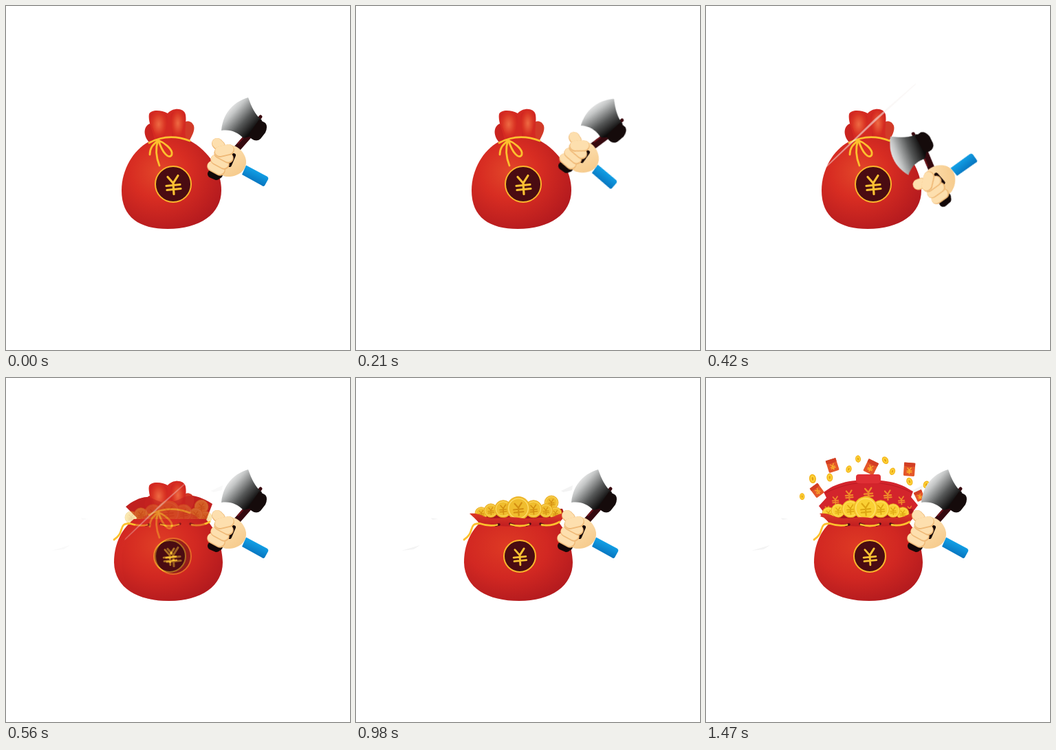
Animation, 500 px wide and 500 px high, one loop 1820 ms. Source, as an HTML page:

```html
<!DOCTYPE html>
<html lang="en">
<head>
<meta charset="utf-8">
<title>Lucky bag</title>
<style>
  html, body { margin: 0; width: 100%; height: 100%; overflow: hidden; background: #fff; }
  svg { display: block; width: 100vw; height: 100vh; }
  .line { fill: none; stroke-linecap: round; stroke-linejoin: round; }
  .tie { stroke: #fcc02e; stroke-width: 2.8; }
</style>
</head>
<body>
<svg viewBox="0 0 500 500">
  <defs>
    <radialGradient id="bodyRed" cx=".38" cy=".38" r=".72">
      <stop offset="0" stop-color="#e2472a"/>
      <stop offset=".4" stop-color="#d82d22"/>
      <stop offset="1" stop-color="#b0181e"/>
    </radialGradient>
    <radialGradient id="openRed" cx=".4" cy=".34" r=".74">
      <stop offset="0" stop-color="#de3a24"/>
      <stop offset=".5" stop-color="#d22822"/>
      <stop offset="1" stop-color="#b0191e"/>
    </radialGradient>
    <radialGradient id="lobe" cx=".5" cy=".45" r=".6">
      <stop offset="0" stop-color="#ee6a43"/>
      <stop offset=".6" stop-color="#da3524"/>
      <stop offset="1" stop-color="#cc201f"/>
    </radialGradient>
    <linearGradient id="lipRed" x1="0" y1="0" x2="0" y2="1">
      <stop offset="0" stop-color="#dd3a27"/>
      <stop offset="1" stop-color="#bf1c20"/>
    </linearGradient>
    <linearGradient id="steel" gradientUnits="userSpaceOnUse" x1="322" y1="146" x2="359" y2="180">
      <stop offset="0" stop-color="#f4f4f4"/>
      <stop offset=".25" stop-color="#c4c6c6"/>
      <stop offset=".65" stop-color="#555757"/>
      <stop offset="1" stop-color="#0e0c0c"/>
    </linearGradient>
    <linearGradient id="skin" x1="0" y1="0" x2=".6" y2="1">
      <stop offset="0" stop-color="#ffe5b8"/>
      <stop offset="1" stop-color="#f6cb8d"/>
    </linearGradient>
    <linearGradient id="cloth" gradientUnits="userSpaceOnUse" x1="366" y1="239" x2="359" y2="255">
      <stop offset="0" stop-color="#12a2e8"/>
      <stop offset="1" stop-color="#0876c0"/>
    </linearGradient>
    <path id="yen" class="line" d="M-8-10L0-1L7-12M-10 3L10 1M-9 9L11 7M0-1L1 15"/>
    <g id="crown">
      <path fill="#c9231f" d="M218 196L207 197C199 187 200 175 209 171C215 176 218 187 218 196Z"/>
      <path fill="#d23a28" d="M256 193L266 197C270 189 275 181 273 174C270 167 264 166 259 169Z"/>
      <path fill="#d42a22" d="M216 195C213 181 206 168 208 157C211 150 226 151 235 156C243 147 259 148 261 158C263 170 258 182 262 194Z"/>
      <path fill="url(#lobe)" d="M219 194C216 180 207 168 210 158C214 151 229 153 234 160C236 172 231 184 229 194Z"/>
      <path fill="url(#lobe)" d="M240 193C244 181 238 167 240 158C245 149 258 151 260 159C261 171 254 182 255 193Z"/>
    </g>
  </defs>

  <g id="wisps" fill="#f3f3f3">
    <path d="M66 251L93 243L84 249Z"/>
    <path d="M109 203.5L120 205L111 206Z"/>
    <path d="M298 164L315 156L314 163L301 166Z"/>
  </g>

  <use id="oldCrown" href="#crown"/>
  <g id="burst"></g>
  <g id="panel"></g>
  <g id="open">
    <path id="flap" fill="#c0201f" d="M174 187C182 180 195 173 205 173C215 174 222 182 235 181C248 181 256 172 268 171C280 171 292 178 300 183L289 212H187L190 203Z"/>
    <path id="rim" fill="#a9161d" d="M174 200L179 191L300 190L304 200L290 208H188Z"/>
    <g id="coinsA"></g>
    <g id="coinsB"></g>
    <path fill="url(#openRed)" d="M186 205C165 222 157 245 157 268C158 306 192 324 237 324C284 324 315 302 315 268C314 245 306 220 290 205Z"/>
    <path id="lip" fill="url(#lipRed)" d="M165 197C181 195 186 204 201 204C216 204 223 201 237 203C252 206 266 202 278 203C291 203 295 194 308 197C303 202 298 206 294 213Q237 219 180 213C176 206 171 203 165 197Z"/>
    <path class="line" stroke="#4b0d13" stroke-width="3.5" d="M203 214L208 213M224 212L230 214M248 214L253 212M268 212L274 214"/>
    <path class="line tie" d="M205 213.5Q193 216 180 211.5C162 211 174 224 157 235M225 213Q238 217 251 213M270 213.5Q284 216 296 209"/>
    <g id="openMark"></g>
  </g>

  <g id="closed">
    <use href="#crown"/>
    <path fill="url(#bodyRed)" d="M208 197C185 209 168 238 168 268C168 308 195 324 235 324C282 324 313 302 313 268C313 240 296 211 266 195C250 189 225 189 208 197Z"/>
    <path class="line tie" d="M208 199Q236 184 267 196M222 195C212 202 209 208 209 216M221 195C216 210 219 222 223 232M221 195C229 198 243 208 241 216C237 224 227 213 222 196"/>
    <g id="closedMark"></g>
  </g>

  <path id="slash" fill="#f6f1ef" d="M326.5 94.5L258 157L175 235L177 231L257 153L325.5 93.5Z"/>

  <g id="axe">
    <path fill="url(#cloth)" d="M349 231.5L380 248Q382 250 381 252L376 261Q374 263 372 261L343 245Z"/>
    <path class="line" stroke="#35090f" stroke-width="10" stroke-linecap="butt" d="M306 242L336 207L365 174"/>
    <path class="line" stroke="#6d141c" stroke-width="2" d="M337 200L352 183"/>
    <path class="line" stroke="#3b0b10" stroke-width="5" d="M366 166L370 161"/>
    <path fill="url(#steel)" d="M352 133C335 138 316 151 313 181C327 179 337 184 345 192L361 188L372 166C362 158 357 147 352 133Z"/>
    <path fill="#150b0b" d="M356 182L368 165L377 170Q381 175 377 184L370 193Q364 198 357 193Q351 189 356 182Z"/>
    <path class="line" stroke="#130808" stroke-width="12" d="M299 244L306 247M303 241L309 245"/>
    <path fill="url(#skin)" d="M317 206C329 196 347 209 349 225C350 240 336 249 320 248C307 247 304 227 317 206Z"/>
    <path class="line" stroke="#180808" stroke-width="6" d="M331 217L325 231"/>
    <g id="fingers" class="line"></g>
  </g>
</svg>

<script>
const LOOP = 1820, STEP = 70;
const $ = id => document.getElementById(id);
const fill = (id, html) => { $(id).innerHTML = html; };
const times = (n, make) => Array.from({ length: n }, (_, i) => make(i)).join('');

let seed = 11;
const random = () => (seed = seed * 16807 % 2147483647) / 2147483647;

const yen = (x, y, s, color, w = 3.2) =>
  `<use href="#yen" transform="translate(${x} ${y}) scale(${s})" stroke="${color}" stroke-width="${w}"/>`;

const mark = (x, y, r) =>
  `<circle cx="${x}" cy="${y}" r="${r}" fill="#4a0c12" stroke="#fbb62b" stroke-width="2"/>` +
  yen(x, y - .5, r / 26, '#fcc233');

const coin = (x, y, r, face, ink) =>
  `<circle cx="${x}" cy="${y}" r="${r}" fill="${face}" stroke="#e7a91e" stroke-width=".8"/>` +
  `<circle cx="${x}" cy="${y}" r="${r * .84}" fill="none" stroke="#ffe071" stroke-width="${r * .07}"/>` +
  yen(x, y, r / 25, ink);

// Seven coins, smaller and lower towards the sides, the big one in front.
const pile = (cx, face, ink) => [-3, 3, -2, 2, -1, 1, 0].map(i => {
  const n = Math.abs(i);
  return coin(cx + Math.sign(i) * (24 * n - 2 * n * n), 189.5 + .8 * n * n,
    9 + 8 * (1 - n / 3) ** 2, face, ink);
}).join('');

const chip = r =>
  `<ellipse rx="${r * .75}" ry="${r}" fill="#f3b51c"/>
   <ellipse rx="${r * .52}" ry="${r * .75}" fill="#fdd238"/>
   <ellipse rx="${r * .2}" ry="${r * .4}" fill="#e5a012"/>`;

const packet = w =>
  `<rect x="${-w / 2}" y="${-w * .6}" width="${w}" height="${w * 1.2}" rx="1.5" fill="#e4572a"/>
   <path d="M${-w / 2} ${-w * .6}h${w}v${w * .3}q${-w / 2} ${w * .15} ${-w} 0Z" fill="#d23e24"/>` +
  yen(0, w * .1, w / 48, '#fbb52c', 4);

// Coins and packets fan out over the bag, every third one a packet.
const flying = i => {
  const a = Math.PI * (1.06 + .86 * i / 13);
  const reach = i % 2 ? .82 : 1;
  const x = 234 + 96 * reach * Math.cos(a), y = 185 + 68 * reach * Math.sin(a);
  const body = i % 3 === 1 ? packet(12 + 7 * random()) : chip(5 + 2 * random());
  return `<g transform="translate(${x} ${y}) rotate(${80 * random() - 40})">${body}</g>`;
};

const finger = (d, w) =>
  `<path d="${d}" stroke="#efb977" stroke-width="${w}"/>` +
  `<path d="${d}" stroke="#fddfae" stroke-width="${w - 2}" transform="translate(-.3 -.9)"/>`;

fill('closedMark', mark(243, 259, 26));
fill('openMark', mark(238, 259, 23));
fill('coinsA', coin(284, 181, 10, '#f0bd2e', '#d48f12') + pile(236, '#f0bd2e', '#d48f12'));
fill('coinsB', pile(232, '#fad034', '#dda512'));
fill('burst', times(14, flying));
fill('fingers',
  times(3, i => finger(`M${300 + 5 * i} ${233 - 9.5 * i}l${11 + i} ${6 + i / 2}`, 15.5)) +
  finger('M307 200L311 204', 16) + finger('M311 212L324 209', 16));
fill('panel',
  `<path fill="#d3242c" d="M218 149C204 150 190 154 180 160L171 166L175 174L164 186L171 195L166 201L188 209H288L305 200L301 194L308 185L298 173L301 165L289 158C279 153 267 150 254 149Z"/>
   <path class="line" stroke="#b91a23" stroke-width="1.2" d="M174 167Q203 152 236 152Q270 152 298 166"/>
   <rect x="218" y="140" width="36" height="13" rx="4" fill="#df2f35"/>` +
  times(7, k => {
    const i = k - 3, n = Math.abs(i);
    return yen(236 + Math.sign(i) * (32 * n - 4 * n * n), 167 + 2.6 * n * n, .6 - .085 * n, '#f08a2a', 4);
  }));

// Moves between key poses in steps; two rows at one time make a hard change.
function play(id, style, rows) {
  const keys = [[0, ...rows[0].slice(1)], ...rows, [LOOP, ...rows.at(-1).slice(1)]];
  const frames = keys.map(([ms, ...pose], i) => {
    const next = keys[i + 1] || [ms];
    const n = Math.max(1, Math.round((next[0] - ms) / STEP));
    return { ...style(...pose), offset: ms / LOOP, easing: `steps(${n}, end)` };
  });
  $(id).animate(frames, { duration: LOOP, iterations: Infinity });
}

const fade = opacity => ({ opacity });
const swing = (x, y, a) =>
  ({ transform: `translate(${x}px, ${y}px) rotate(${a}deg) translate(-320px, -221px)` });
const grow = (x, y) => (sx, sy, opacity = 1) =>
  ({ opacity, transform: `translate(${x}px, ${y}px) scale(${sx}, ${sy}) translate(${-x}px, ${-y}px)` });
const rise = (dy, opacity) => ({ opacity, transform: `translateY(${dy}px)` });

play('axe', swing, [[0, 320, 221, 0], [140, 318, 184, 66], [350, 340, 275, -96], [560, 320, 221, 0]]);
play('slash', grow(168, 237), [[350, 1, 1, 0], [350, 1, 1, .65], [560, .6, .6, .45], [700, .6, .6, 0]]);
play('closed', fade, [[490, 1], [560, .45], [700, 0]]);
play('oldCrown', fade, [[560, 0], [560, 1], [700, 0]]);
play('open', fade, [[560, 0], [560, 1]]);
play('wisps', fade, [[490, 0], [630, 1]]);
play('lip', fade, [[560, 0], [700, 1]]);
play('rim', fade, [[560, 0], [700, 1]]);
play('coinsA', rise, [[560, 6, .4], [770, 0, 1], [1190, 0, 1], [1190, 0, 0]]);
play('coinsB', fade, [[1190, 0], [1190, 1]]);
play('flap', grow(237, 208), [[770, 1, 1], [980, 1, .4, 0]]);
play('panel', grow(237, 208), [[1120, 1, 0], [1260, 1, 1]]);
play('burst', grow(234, 185), [[1330, 0, 0], [1470, 1, 1]]);
</script>
</body>
</html>
```
